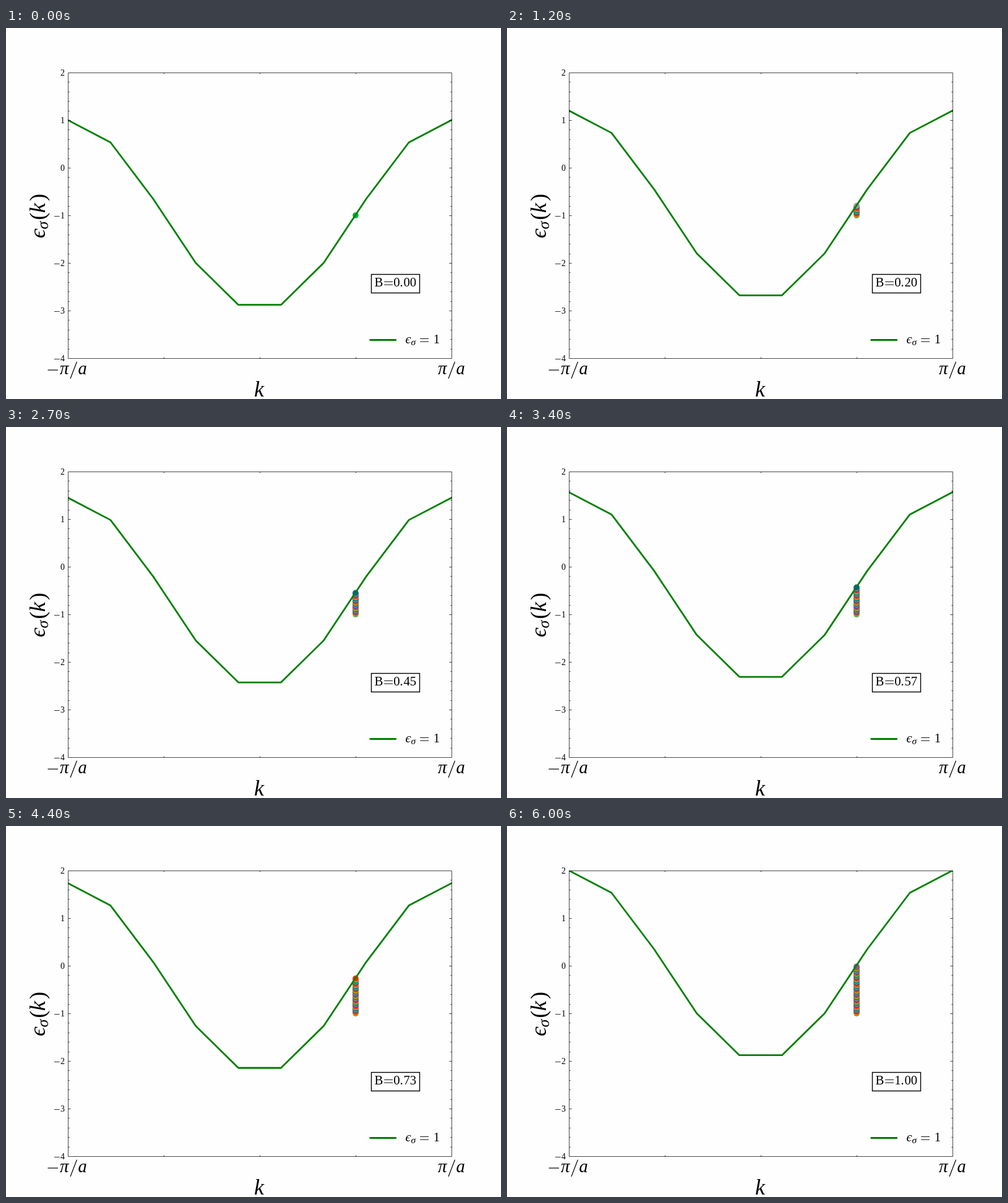
Animation, 800 px wide and 600 px high, one loop 9.84 s. Source, as an HTML page:

```html
<!DOCTYPE html>
<html lang="en">
<head>
<meta charset="utf-8">
<title>Band energy in a field</title>
<style>
  html, body { margin: 0; width: 100%; height: 100%; overflow: hidden; background: #fefefe; }
  svg { display: block; width: 800px; height: 600px; }
  text { font-family: "Liberation Serif", "Times New Roman", serif; fill: #000; white-space: pre; }
  .it { font-style: italic; }
  .axis { fill: none; stroke: #000; stroke-opacity: .7; stroke-width: 1; }
  .rule { fill: none; stroke: #000; }
  .band { fill: none; stroke: #008000; stroke-width: 2.8; stroke-linejoin: round; stroke-linecap: square; }
</style>
</head>
<body>
<svg viewBox="0 0 800 600">
  <defs><clipPath id="plot"><rect x="100" y="72" width="621" height="463"/></clipPath></defs>
  <g id="dots"></g>
  <g clip-path="url(#plot)"><path id="curve" class="band"/></g>
  <path id="frame" class="axis"/>
  <g id="labels"></g>

  <rect x="590.5" y="398.5" width="78" height="30" fill="#fff" stroke="#000" stroke-width="1.4"/>
  <text id="field" font-size="20.8" y="418"></text>
  <path class="rule" stroke-width=".95" d="M611.2 410.4H625M611.2 415.2H625"/>

  <path class="band" d="M589 504.5H629.5"/>
  <text class="it" font-size="20.8" x="645.5" y="510">є</text>
  <text class="it" font-size="15.5" x="654.5" y="513.2">σ</text>
  <path class="rule" stroke-width=".95" d="M669.2 502.4H683M669.2 507.2H683"/>
  <text font-size="20.8" x="690.8" y="510">1</text>

  <text class="it" font-size="36" x="401" y="596">k</text>
  <g transform="translate(63 340) rotate(-90)">
    <text class="it" font-size="36" x="0" y="0">є</text>
    <text class="it" font-size="26" x="14.5" y="5.2">σ</text>
    <text font-size="36" x="29.5" y="0">(</text>
    <text class="it" font-size="36" x="41" y="0">k</text>
    <text font-size="36" x="60" y="0">)</text>
  </g>
</svg>
<script>
const LEFT = 100, RIGHT = 720, TOP = 72, BOTTOM = 534, UNIT = 77;
const STEPS = 60, STEP_MS = 100, LOOP_MS = 9840;
const COLORS = ['#0c5da5', '#00b945', '#ff9500', '#ff2c00', '#845b97', '#474747', '#9e9e9e'];

const $ = id => document.getElementById(id);
const toY = v => TOP + (2 - v) * UNIT;

function add(parent, tag, attrs, text) {
  const el = document.createElementNS('http://www.w3.org/2000/svg', tag);
  for (const key in attrs) el.setAttribute(key, attrs[key]);
  if (text) el.textContent = text;
  parent.appendChild(el);
  return el;
}

function drawAxes() {
  const labels = $('labels');
  let d = `M${LEFT + .5} ${TOP + .5}H${RIGHT + .5}V${BOTTOM + .5}H${LEFT + .5}Z`;
  for (let n = 1; n < 30; n++) {
    const y = Math.round(toY(2 - n / 5)) + .5;
    const len = n % 5 ? 2.1 : 4.2;
    d += `M${LEFT + .5} ${y}h${len}M${RIGHT + .5} ${y}h${-len}`;
  }
  for (const x of [255.5, 410.5, 565.5]) {
    d += `M${x} ${TOP + .5}v2.1M${x} ${BOTTOM + .5}v-2.1`;
  }
  $('frame').setAttribute('d', d);

  for (let v = -4; v <= 2; v++) {
    const y = toY(v) + 4.8;
    add(labels, 'text', { x: 95, y, 'font-size': 13.9, 'text-anchor': 'end' }, String(Math.abs(v)));
    if (v < 0) add(labels, 'path', { class: 'rule', 'stroke-width': .8, d: `M78 ${y - 3.3}h8.6` });
  }
  for (const x of [87, 698]) {
    add(labels, 'text', { class: 'it', x, y: 560, 'font-size': 29 }, 'π');
    add(labels, 'path', { class: 'rule', 'stroke-width': 1.2, d: `M${x + 17} 567L${x + 27.5} 539.8` });
    add(labels, 'text', { class: 'it', x: x + 29.5, y: 560, 'font-size': 28.5 }, 'a');
  }
  add(labels, 'path', { class: 'rule', 'stroke-width': 1.2, d: 'M67.5 553.2h16.5' });
}

// Energy -2cos(k) - 1, sampled at ten momenta
function drawCurve() {
  const pts = Array.from({ length: 10 }, (_, n) => {
    const k = Math.PI * (2 * n / 9 - 1);
    return `${LEFT + (RIGHT - LEFT) * n / 9} ${toY(-2 * Math.cos(k) - 1)}`;
  });
  $('curve').setAttribute('d', 'M' + pts.join('L'));
}

function makeDots() {
  return Array.from({ length: STEPS }, (_, n) => add($('dots'), 'circle', {
    cx: 565, cy: toY(n / STEPS - 1), r: 4.85, fill: COLORS[(n + 1) % COLORS.length]
  }));
}

drawAxes();
drawCurve();
const dots = makeDots();
$('field').setAttribute('x', '595.6 610 626.2 636.6 642.4 652.8');

let shown = -1;
function show(step) {
  if (step === shown) return;
  shown = step;
  const b = step / STEPS;
  $('curve').setAttribute('transform', `translate(0 ${-b * UNIT})`);
  // The gap holds the place of the drawn equals sign
  $('field').textContent = 'B\u00a0' + b.toFixed(2);
  dots.forEach((dot, n) => dot.setAttribute('visibility', n <= step ? 'visible' : 'hidden'));
}

let start;
function tick(now) {
  if (start === undefined) start = now;
  show(Math.min(STEPS, Math.floor((now - start) % LOOP_MS / STEP_MS)));
  requestAnimationFrame(tick);
}
show(0);
requestAnimationFrame(tick);
</script>
</body>
</html>
```
